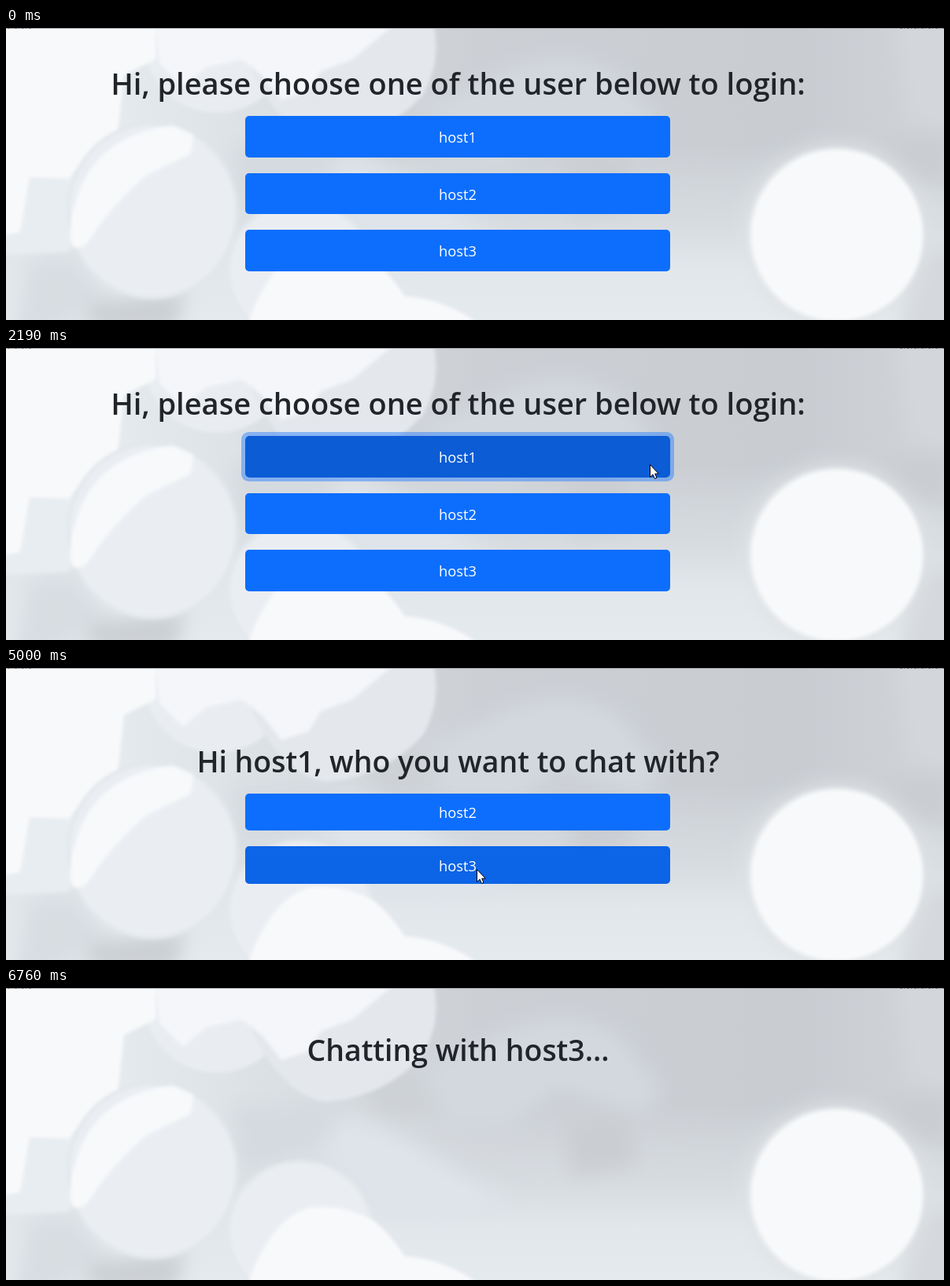
An HTML page for the animation above (7180 ms loop, 1192 by 372 pixels).

```html
<!DOCTYPE html>
<html lang="en">
<head>
<meta charset="utf-8">
<title>Choose who to chat with</title>
<style>
  html, body { margin: 0; width: 100%; height: 100%; overflow: hidden; background: #dde1e6; }
  svg { display: block; width: 1192px; height: 372px; }
  text { font-family: "Open Sans", "Noto Sans", sans-serif; text-anchor: middle; }
  .title { font-size: 37.4px; font-weight: 600; fill: #212529; }
  .login .title { font-size: 38px; }
  .label { font-size: 18.3px; fill: #fff; }
  .btn { fill: #0d6efd; }
  .ring { fill: none; stroke: #3184fd; stroke-width: 5; opacity: 0; }

  /* every change is a hard step on one shared 7180 ms clock */
  .page, .pointer, .press1 .btn, .press1 .ring, .press3 .btn, .press3 .ring {
    animation: 7180ms step-end infinite;
  }
  .login { animation-name: login; }
  .pick { animation-name: pick; }
  .chat { animation-name: chat; }
  .press1 .btn { animation-name: fill1; }
  .press1 .ring { animation-name: ring1; }
  .press3 .btn { animation-name: fill3; }
  .press3 .ring { animation-name: ring3; }
  .pointer { animation-name: move; }

  @keyframes login { 0% { visibility: visible } 32.72%, 100% { visibility: hidden } }
  @keyframes pick {
    0% { visibility: hidden } 32.72% { visibility: visible } 78.96%, 100% { visibility: hidden }
  }
  @keyframes chat { 0% { visibility: hidden } 78.96%, 100% { visibility: visible } }

  @keyframes fill1 {
    0% { fill: #0d6efd } 20.75% { fill: #0c66ea } 22.42% { fill: #0b5ed7 }
    28.41% { fill: #0a59cd } 30.5%, 100% { fill: #0b5cd5 }
  }
  @keyframes ring1 { 0% { opacity: 0 } 28.41% { opacity: .3 } 30.5%, 100% { opacity: .5 } }
  @keyframes fill3 {
    0% { fill: #0d6efd } 69.63% { fill: #0c64e6 } 71.3% { fill: #0b5ed7 } 77.29%, 100% { fill: #0a59d0 }
  }
  @keyframes ring3 { 0% { opacity: 0 } 77.29%, 100% { opacity: .5 } }

  @keyframes move {
    0% { transform: translate(1200px, 400px) }
    9.05% { transform: translate(970px, 343px) }
    10.72% { transform: translate(1049px, 238px) }
    12.81% { transform: translate(1022px, 149px) }
    14.9% { transform: translate(1008px, 138px) }
    16.99% { transform: translate(940px, 126px) }
    18.66% { transform: translate(852px, 118px) }
    20.75% { transform: translate(836px, 128px) }
    22.42% { transform: translate(819px, 145px) }
    28.41% { transform: translate(818px, 148px) }
    32.72% { transform: translate(935px, 285px) }
    34.81% { transform: translate(937px, 333px) }
    60.02% { transform: translate(935px, 333px) }
    62.11% { transform: translate(912px, 333px) }
    64.2% { transform: translate(840px, 323px) }
    65.87% { transform: translate(736px, 301px) }
    67.54% { transform: translate(652px, 284px) }
    69.63% { transform: translate(598px, 256px) }
    71.3% { transform: translate(584px, 255px) }
    78.96% { transform: translate(612px, 279px) }
    80.77% { transform: translate(690px, 310px) }
    82.86% { transform: translate(843px, 313px) }
    84.95% { transform: translate(847px, 313px) }
    87.04% { transform: translate(890px, 321px) }
    88.71% { transform: translate(970px, 338px) }
    90.38% { transform: translate(1050px, 358px) }
    92.06% { transform: translate(1102px, 371px) }
    94.15%, 100% { transform: translate(1200px, 400px) }
  }
</style>
</head>
<body>
<svg viewBox="0 0 1192 372">
  <defs>
    <linearGradient id="base">
      <stop offset="0" stop-color="#f1f4f7"/>
      <stop offset=".15" stop-color="#e3e8ec"/>
      <stop offset=".32" stop-color="#d9dee2"/>
      <stop offset=".5" stop-color="#cccfd4"/>
      <stop offset=".85" stop-color="#c9cdd2"/>
      <stop offset="1" stop-color="#d0d4d8"/>
    </linearGradient>
    <linearGradient id="floor" x2="0" y2="1">
      <stop offset=".4" stop-color="#e1e6ea" stop-opacity="0"/>
      <stop offset=".66" stop-color="#dce1e5" stop-opacity=".7"/>
      <stop offset=".82" stop-color="#e2e7eb"/>
      <stop offset="1" stop-color="#e5eaee"/>
    </linearGradient>
    <filter id="soft" filterUnits="userSpaceOnUse" x="-80" y="-80" width="1352" height="532">
      <feGaussianBlur stdDeviation="12"/>
    </filter>
    <filter id="edge" filterUnits="userSpaceOnUse" x="-80" y="-80" width="1352" height="532">
      <feGaussianBlur stdDeviation="2"/>
    </filter>
  </defs>

  <!-- out-of-focus lights -->
  <path fill="url(#base)" d="M0 0H1192V372H0Z"/>
  <path fill="url(#floor)" d="M0 0H1192V372H0Z"/>
  <g filter="url(#soft)">
    <path fill="#d3d8de" d="M640 50Q720 20 780 60L835 130 810 165 700 130 640 180 560 180 530 100Z"/>
    <path fill="#d3d7db" d="M1125-20H1220V130L1150 125Z"/>
    <path fill="#cacdd1" d="M710 170L790 160 800 225 720 240ZM1100 140L1200 130V205L1150 190Z"/>
    <path fill="#d5dae0" d="M285 150L430 145 400 205 300 235Z"/>
    <path fill="#cdd1d5" d="M450 125L520 105 535 160 480 160Z"/>
    <path fill="#dfe4ea" d="M432 165Q490 180 540 215L640 275 560 300 470 290 400 205Z"/>
    <path fill="#d8dde2" d="M30 295L85 290 130 345 60 390 10 390Z"/>
    <path fill="#cbcfd3" d="M110 350L230 335 215 385 100 385Z"/>
    <path fill="#d5d9dd" d="M1165 280H1220V400H1130Z"/>
    <circle cx="1054" cy="264" r="116" fill="#dfe3e6"/>
  </g>
  <g filter="url(#edge)">
    <path fill="#e8edf1" d="M20 190L100 180 80 285-10 290-10 255Z"/>
    <circle cx="268" cy="14" r="94" fill="#e9edf1"/>
    <path fill="#e4e8ed" d="M310 50Q350 135 405 145 480 140 530 85 555 40 542-10H330Z"/>
    <path fill="#f4f6f9" d="M190-10H500L440 40 400 55 385 80 350 92 325 60 300 40 255 50 225 75 195 45Z"/>
    <path fill="#f8f9fb" d="M-10-10H190V40L150 60 140 150 100 165 80 192 30 190 18 260-10 265Z"/>

    <ellipse cx="186" cy="233" rx="109" ry="113" fill="#e2e7eb"/>
    <ellipse cx="186" cy="233" rx="105" ry="109" fill="#eaeef3"/>
    <path fill="#f7f9fb" d="M212 124Q120 135 92 210 76 255 84 278 95 285 106 270 135 225 180 187L235 160 238 136Z"/>

    <ellipse cx="374" cy="310" rx="94" ry="91" fill="#e3e8ec"/>
    <ellipse cx="374" cy="310" rx="89" ry="87" fill="#eaeef2"/>
    <path fill="#f8f9fb" d="M306 380Q335 295 385 280 430 275 468 297 490 315 507 342 560 345 605 380Z"/>

    <circle cx="1055" cy="264" r="112" fill="#e7eaec"/>
    <circle cx="1056" cy="264" r="109" fill="#f6f8fa"/>
  </g>
  <circle cx="1056" cy="264" r="106" fill="#f8f9fb"/>
  <path stroke="#a4a7aa" d="M0 .5H1192"/>
  <path stroke="#6c6f72" stroke-dasharray="3 2 1 3" d="M2 .5H32M1136 .5H1192"/>

  <g class="page login">
    <text class="title" x="574.5" y="85">Hi, please choose one of the user below to login:</text>
    <g class="press1">
      <rect class="ring" x="301.5" y="109.5" width="545" height="58" rx="7"/>
      <rect class="btn" x="304" y="112" width="540" height="53" rx="5"/>
    </g>
    <rect class="btn" x="304" y="185" width="540" height="52" rx="5"/>
    <rect class="btn" x="304" y="257" width="540" height="53" rx="5"/>
    <text class="label" x="574" y="146">host1</text>
    <text class="label" x="574" y="219">host2</text>
    <text class="label" x="574" y="291">host3</text>
  </g>

  <g class="page pick">
    <text class="title" x="574.5" y="133">Hi host1, who you want to chat with?</text>
    <rect class="btn" x="304" y="160" width="540" height="47" rx="5"/>
    <g class="press3">
      <rect class="ring" x="301.5" y="224.5" width="545" height="53" rx="7"/>
      <rect class="btn" x="304" y="227" width="540" height="48" rx="5"/>
    </g>
    <text class="label" x="574" y="191">host2</text>
    <text class="label" x="574" y="259">host3</text>
  </g>

  <g class="page chat">
    <text class="title" x="574.5" y="93">Chatting with host3...</text>
  </g>

  <g class="pointer">
    <path fill="#fff" stroke="#000" d="M.5 .7V16.6L4.1 13.2 6.5 18.5 9 17.4 6.7 12.2H11.4Z"/>
  </g>
</svg>
</body>
</html>
```
